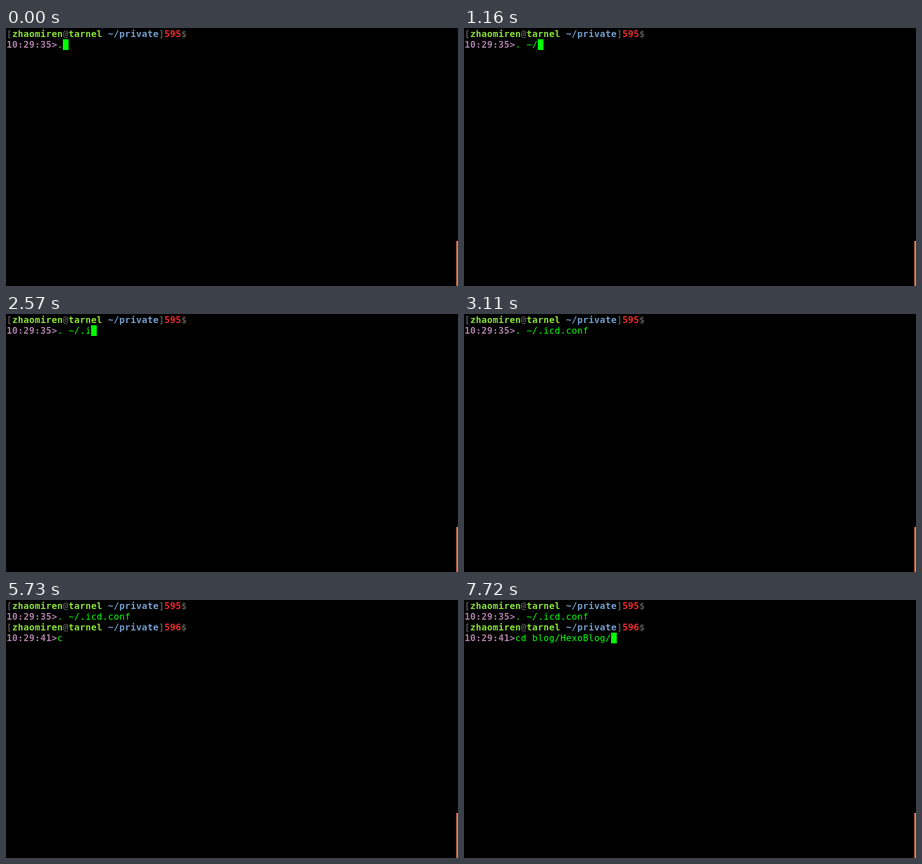
These frames come from a looping animation (802x458 px, 8 s). An HTML page:

```html
<!DOCTYPE html>
<html lang="en">
<head>
<meta charset="utf-8">
<title>Terminal session</title>
<style>
  html, body { margin: 0; width: 100%; height: 100%; overflow: hidden; background: #000; }

  .term {
    position: absolute; left: 1px; top: 1px;
    font: 16px/19px "DejaVu Sans Mono", monospace;
    letter-spacing: calc(10px - 1ch);
    font-variant-ligatures: none;
    color: #0f0;
  }
  .line { height: 19px; display: flex; white-space: pre; }
  b { color: #555753; }
  .user { color: #8ae234; }
  .path { color: #729fcf; }
  .num { color: #ef2929; }
  .time { color: #ad7fa8; }

  .cmd, .cursor, .next { animation: 8s step-end infinite; }
  .cmd { overflow: hidden; width: 0; }
  .source { animation-name: type-source; }
  .cd { animation-name: type-cd; }
  .next { animation-name: show-next; }
  .cursor {
    position: absolute; left: 0; top: 0; width: 10px; height: 19px;
    background: #0f0;
    animation-name: cursor;
  }
  .scrollbar {
    position: absolute; left: 799px; top: 378px; width: 3px; height: 80px;
    background: #e6794e;
  }

  /* One typed character is 10px wide. */
  @keyframes type-source {
    0% { width: 10px; }
    3.125% { width: 20px; }
    10.125% { width: 30px; }
    14.5% { width: 40px; }
    25.5% { width: 50px; }
    32.125% { width: 60px; }
    37.625% { width: 70px; }
    38.875%, 100% { width: 130px; }
  }
  @keyframes show-next {
    0% { opacity: 0; }
    47.5%, 100% { opacity: 1; }
  }
  @keyframes type-cd {
    0% { width: 0; }
    71.625% { width: 10px; }
    72.875% { width: 20px; }
    88.75% { width: 40px; }
    90.125% { width: 50px; }
    92.75% { width: 60px; }
    94.125% { width: 80px; }
    96.5%, 100% { width: 170px; }
  }
  @keyframes cursor {
    0% { transform: translate(100px, 19px); opacity: 1; }
    3.125% { transform: translate(110px, 19px); }
    10.125% { transform: translate(120px, 19px); }
    14.5% { transform: translate(130px, 19px); }
    25.5% { transform: translate(140px, 19px); }
    32.125% { transform: translate(150px, 19px); }
    37.625% { transform: translate(160px, 19px); opacity: 1; }
    38.875% { transform: translate(170px, 57px); opacity: 0; }
    94.125% { transform: translate(170px, 57px); opacity: 1; }
    96.5%, 100% { transform: translate(260px, 57px); opacity: 1; }
  }
</style>
</head>
<body>
<div class="term">
  <div class="line"><b>[</b><b class="user">zhaomiren</b><b>@</b><b class="user">tarnel</b><b class="path"> ~/private</b><b>]</b><b class="num">595</b><b>$</b></div>
  <div class="line"><b class="time">10:29:35&gt;</b><span class="cmd source">. ~/.icd.conf</span></div>
  <div class="next">
    <div class="line"><b>[</b><b class="user">zhaomiren</b><b>@</b><b class="user">tarnel</b><b class="path"> ~/private</b><b>]</b><b class="num">596</b><b>$</b></div>
    <div class="line"><b class="time">10:29:41&gt;</b><span class="cmd cd">cd blog/HexoBlog/</span></div>
  </div>
  <div class="cursor"></div>
</div>
<div class="scrollbar"></div>
</body>
</html>
```
